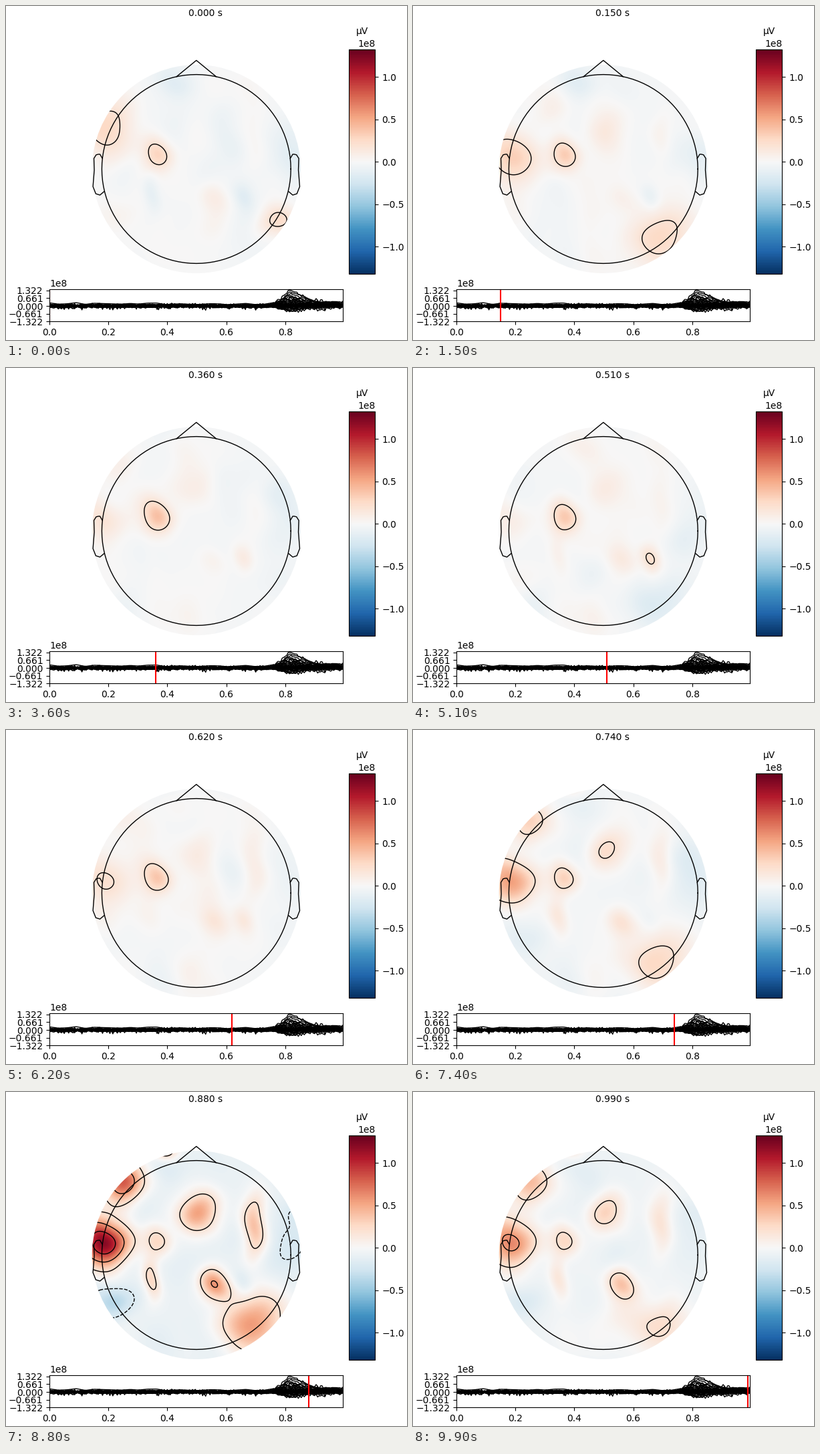
A matplotlib script that plays this animation: 600x500 px, repeating every 10 s.

```python
import numpy as np
import matplotlib.pyplot as plt
from matplotlib.animation import FuncAnimation
from matplotlib.collections import LineCollection
from matplotlib.patches import Circle

W, H, FRAMES = 600, 500, 100
UNIT = 1e8
VMAX = 1.322 * UNIT
CX, CY, R = 284.8, 244, 141.4      # head circle, in pixels
MASK_R = 156
LEVELS = np.linspace(-VMAX, VMAX, 8)[1:-1]

rng = np.random.default_rng(7)
time = np.arange(FRAMES) / 100

# Shared time courses that every source mixes
burst = np.interp(time, [.6, .74, .82, .88, .99], [0, .3, 1.6, 1, .5])
drift_wave = np.cos(2 * np.pi * (time - .15) / .7)
onset = np.exp(-time / .05)

gx = np.arange(CX - 160, CX + 161, 2)
gy = np.arange(CY - 160, CY + 161, 2)
bells, courses = [], []


def warp(x, y):
    """Bend the plane a little so that blobs are not perfect ellipses."""
    return x + 3 * np.sin(y / 13), y + 3 * np.sin(x / 15)


WX, WY = warp(*np.meshgrid(gx, gy))


def flicker(size):
    """Smooth random course that closes over the loop."""
    raw = rng.normal(0, size, FRAMES)
    return (np.roll(raw, 1) + 2 * raw + np.roll(raw, -1)) / 2.45


def source(x, y, sx, sy, rest=0, gain=0, drift=0, start=0, noise=.02):
    cx, cy = warp(x, y)
    bells.append(np.exp(-((WX - cx) / sx) ** 2 / 2 - ((WY - cy) / sy) ** 2 / 2))
    courses.append(rest + gain * burst + drift * drift_wave
                   + start * onset + flicker(noise))


source(147, 226, 27, 25, rest=.24, gain=.95, drift=.1, start=-.24)
source(149, 187, 27, 30, start=.3)
source(175, 134, 22, 22, rest=.04, gain=.87)
source(227, 222, 15, 17, rest=.36, start=-.1)
source(287, 181, 20, 21, rest=.12, gain=.52, start=-.1)
source(371, 201, 12, 32, rest=.06, gain=.4)
source(311, 287, 15, 16, rest=.12, gain=.54)
source(367, 348, 33, 31, rest=.08, gain=.37, drift=.22, start=-.13)
source(407, 319, 20, 17, start=.3)
source(160, 315, 22, 17, rest=.03, gain=-.32)
source(217, 280, 9, 21, rest=.03, gain=.36, start=-.15)
source(428, 225, 24, 30, rest=-.07, drift=-.05, start=-.08)
source(432, 181, 18, 14, gain=-.08)
source(355, 285, 10, 14, rest=.08, drift=-.2, start=-.15)
source(237, 87, 14, 10, gain=.42)
source(256, 117, 19, 16, drift=-.08, start=-.08)
source(272, 372, 16, 26, rest=.06)

# Faint background activity, spread evenly over the disc
for k in range(36):
    r, a = MASK_R * np.sqrt((k + .5) / 36), 2.4 * k
    source(CX + r * np.cos(a), CY + r * np.sin(a), 16, 20, noise=.035)

BELLS, COURSES = np.array(bells), np.array(courses)


def field(i):
    base = -.02 - .07 * burst[i]
    return (np.tensordot(COURSES[:, i], BELLS, 1) + base) * UNIT


fig = plt.figure(figsize=(W / 100, H / 100), dpi=100, facecolor="white")


def add_axes(left, top, right, bottom):
    return fig.add_axes([left / W, 1 - bottom / H,
                         (right - left) / W, (bottom - top) / H])


def label(x, baseline, text):
    return fig.text(x / W, 1 - baseline / H, text,
                    ha="center", va="baseline", fontsize=10)


# Scalp map
head = add_axes(0, 0, W, H)
head.axis("off")
mask = Circle((CX, CY), MASK_R, transform=head.transData)
image = head.imshow(field(0), cmap="RdBu_r", vmin=-VMAX, vmax=VMAX,
                    extent=(gx[0] - 1, gx[-1] + 1, gy[-1] + 1, gy[0] - 1),
                    interpolation="bilinear", aspect="auto")
head.set(xlim=(0, W), ylim=(H, 0))
head.autoscale(False)
image.set_clip_path(mask)


def outline(x, y):
    head.plot(CX + R * np.asarray(x), CY - R * np.asarray(y), "k", lw=1)


angle = np.linspace(0, 2 * np.pi, 101)
outline(np.cos(angle), np.sin(angle))
nose = np.deg2rad(12)
outline([-nose, 0, nose], [.978, 1.15, .978])
ear_x = 2 * np.array([.497, .510, .518, .530, .542,
                      .540, .547, .532, .510, .489])
ear_y = 2 * np.array([.056, .078, .078, .075, .056,
                      -.006, -.093, -.131, -.138, -.120])
outline(ear_x, ear_y)
outline(-ear_x, ear_y)

# Colour bar
bar = add_axes(513.3, 65.2, 552.4, 401.1)
fig.colorbar(image, cax=bar, ticks=np.linspace(-1, 1, 5) * UNIT)
label(532.8, 42, "µV")

# Sensor traces
strip = add_axes(65.1, 424.3, 503.6, 472.2)
t = np.arange(200) / 200
swell = np.interp(t, [.74, .78, .815, .85, .89, .94, .995],
                  [0, .4, 1, .72, .42, .25, .2])


def wander(size, knots):
    return np.interp(t, np.linspace(0, 1, knots), rng.normal(0, size, knots))


traces = [.19 + wander(.05, 34)]
for gain in np.r_[1.32 * np.linspace(0, 1, 30) ** 3, np.linspace(-.45, 0, 10)]:
    fast = rng.normal(0, rng.uniform(.03, .07), t.size)
    spikes = .25 * (rng.random(t.size) < .006)
    traces.append(gain * swell + wander(.05, 26) + fast - spikes)

strip.add_collection(LineCollection(
    [np.c_[t, np.clip(y, -.65, 1.34) * UNIT] for y in traces],
    colors="k", linewidths=1))
strip.set(xlim=(0, .995), ylim=(-VMAX, 1.41 * UNIT),
          yticks=np.linspace(-VMAX, VMAX, 5), xticks=np.arange(0, .9, .2))
cursor = strip.axvline(0, color="r", lw=1.5)
clock = label(298.5, 15, "")

contours = []


def update(i):
    while contours:
        contours.pop().remove()
    z = field(i)
    image.set_data(z)
    lines = head.contour(gx, gy, z, LEVELS, colors="k", linewidths=1)
    lines.set_clip_path(mask)
    contours.append(lines)
    cursor.set_xdata([time[i], time[i]])
    clock.set_text(f"{time[i]:.3f} s")
    return image, cursor, clock


anim = FuncAnimation(fig, update, frames=FRAMES, interval=100,
                     repeat=True, repeat_delay=0, blit=False)
plt.show()
```
